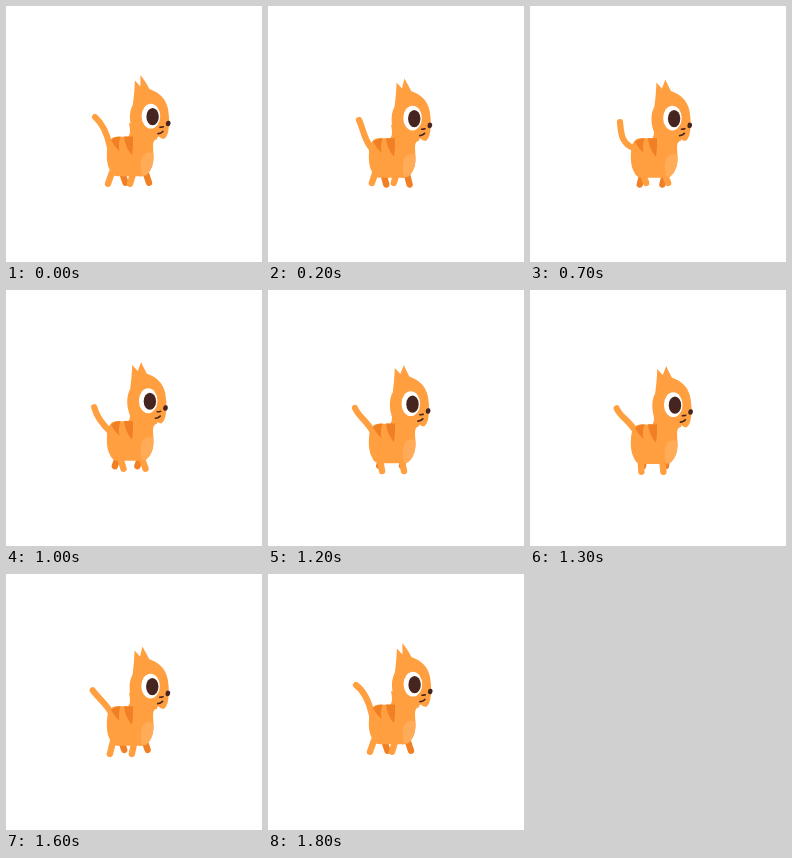
Recreate the animation shown at these times as an HTML page with a canvas. Size 256 by 256 pixels, loop 1.9 s.

```html
<!DOCTYPE html>
<html>
<head>
<meta charset="utf-8">
<style>
html, body { margin: 0; width: 100%; height: 100%; overflow: hidden; background: #fff; }
canvas { display: block; width: 256px; height: 256px; }
</style>
</head>
<body>
<canvas id="stage" width="256" height="256"></canvas>
<script>
const ctx = document.getElementById('stage').getContext('2d');
const LOOP = 1900, STRIDE = 1800, STEP = 100;
const FUR = '#ff9f40', DARK = '#f18024', LIGHT = '#ffab58', BROWN = '#46241f';

// Tail poses: time, then tip, two bends and base.
const TAIL = [
  [0, 89, 111, 96, 117, 101, 127, 104, 141],
  [200, 91, 114, 95, 122, 96, 134, 104, 143],
  [500, 92, 117, 93, 127, 94, 138, 104, 143],
  [700, 90, 116, 91, 126, 91, 138, 104, 142],
  [1200, 87, 118, 90, 126, 98, 130, 105, 142],
  [1500, 86, 119, 91, 129, 100, 130, 106, 139],
  [1800, 88, 111, 96, 117, 101, 127, 104, 141]
];

function tailAt(t) {
  let i = 0;
  while (i < TAIL.length - 2 && TAIL[i + 1][0] < t) i++;
  const a = TAIL[i], b = TAIL[i + 1];
  const k = (t - a[0]) / (b[0] - a[0]);
  return a.slice(1).map((v, n) => v + (b[n + 1] - v) * k);
}

function fill(path, color) {
  ctx.fillStyle = color;
  ctx.fill(new Path2D(path));
}

function oval(x, y, rx, ry, color, turn = 0) {
  ctx.beginPath();
  ctx.ellipse(x, y, rx, ry, turn, 0, Math.PI * 2);
  ctx.fillStyle = color;
  ctx.fill();
}

function stroke(path, width, color) {
  ctx.lineWidth = width;
  ctx.strokeStyle = color;
  ctx.stroke(new Path2D(path));
}

function leg(hipX, hipY, footX, footY, color) {
  stroke(`M${hipX} ${hipY}L${footX} ${footY - 3}`, 6.4, color);
}

function drawBody(dy) {
  ctx.save();
  ctx.translate(0, dy);
  fill('M110 134.5 H122 C125 132 124 126 123 121 H155 L151 137 C146 138 147 143 147.5 152 ' +
    'C148 162 145 169 140 173 Q137 174.5 133 174 H112 Q106 174 104 168 ' +
    'C101 163 100.500 155 101 149 C101 141 104 135 110 134.5Z', FUR);
  fill('M138 152 C143 149 147 150 147.500 153 C148 162 145 169 140 173 L136 173 C134 166 134 157 138 152Z', LIGHT);
  fill('M105 138 Q108 134.500 114.500 134.300 Q112 142 113.500 149 Q108 144 105 138Z', DARK);
  fill('M118 134.300 H127 Q127.500 144 126 153 Q119 145 118 134.300Z', DARK);
  ctx.restore();
}

function drawHead(x, y, sweep) {
  ctx.save();
  ctx.translate(x, y);
  fill(`M-35 -19 C-34 -27 -33.500 -31 -33 -43 L-27.500 -37 L${-24 - 3.5 * sweep} ${-46 - 2.5 * sweep} ` +
    'C-22 -41 -20 -38 -18.500 -34.500 C-9 -31 -2 -25 0 -15 C1 -9 1.500 -5 1 0 ' +
    'C1 7 0 13 -4 15.500 Q-7 15 -9 13 C-17 17 -28 16 -34 10 C-38 2 -40 -10 -35 -19Z', FUR);
  oval(-17, -7.3, 9.3, 12.4, '#fff');
  oval(-15.3, -6.8, 6.2, 8.6, BROWN);
  oval(0.3, 0, 2.3, 2.8, BROWN, 0.2);
  stroke('M-8 3.800Q-6 3.800 -4.500 3.300', 1.5, BROWN);
  stroke('M-9.800 10.200Q-7 10 -5 8', 1.7, BROWN);
  ctx.restore();
}

function draw(t) {
  const a = t / STRIDE * Math.PI * 2;
  const c = Math.cos(a), s = Math.sin(a);
  const bob = 1 - Math.cos(2 * a);
  const bodyY = -3.7 + 1.9 * bob;
  const hipY = 170 + bodyY;
  const nearY = 180.7 - 2.3 * s + 0.9 * bob;
  const farY = 179.7 + 2.1 * s + 0.6 * bob;

  ctx.fillStyle = '#fff';
  ctx.fillRect(0, 0, 256, 256);
  ctx.lineCap = 'round';
  ctx.lineJoin = 'round';

  leg(114 + 2 * c, hipY, 114 + 5.5 * c, farY, DARK);
  leg(137 + 2.5 * c, hipY, 137 + 6 * c, farY, DARK);

  const [x0, y0, x1, y1, x2, y2, x3, y3] = tailAt(Math.min(t, STRIDE));
  stroke(`M${x0} ${y0}C${x1} ${y1} ${x2} ${y2} ${x3} ${y3}`, 6.2, FUR);

  leg(110 - 4 * c, hipY, 110 - 8 * c, nearY, FUR);
  leg(131.5 - 4 * c, hipY, 132 - 8 * c, nearY, FUR);

  drawBody(bodyY);
  drawHead(160.5 + 1.4 * c, 117.5 + 2.3 * bob, Math.max(0, c) ** 4);
}

function frame() {
  const t = performance.now() % LOOP;
  draw(Math.floor(t / STEP) * STEP);
  requestAnimationFrame(frame);
}
frame();
</script>
</body>
</html>
```
